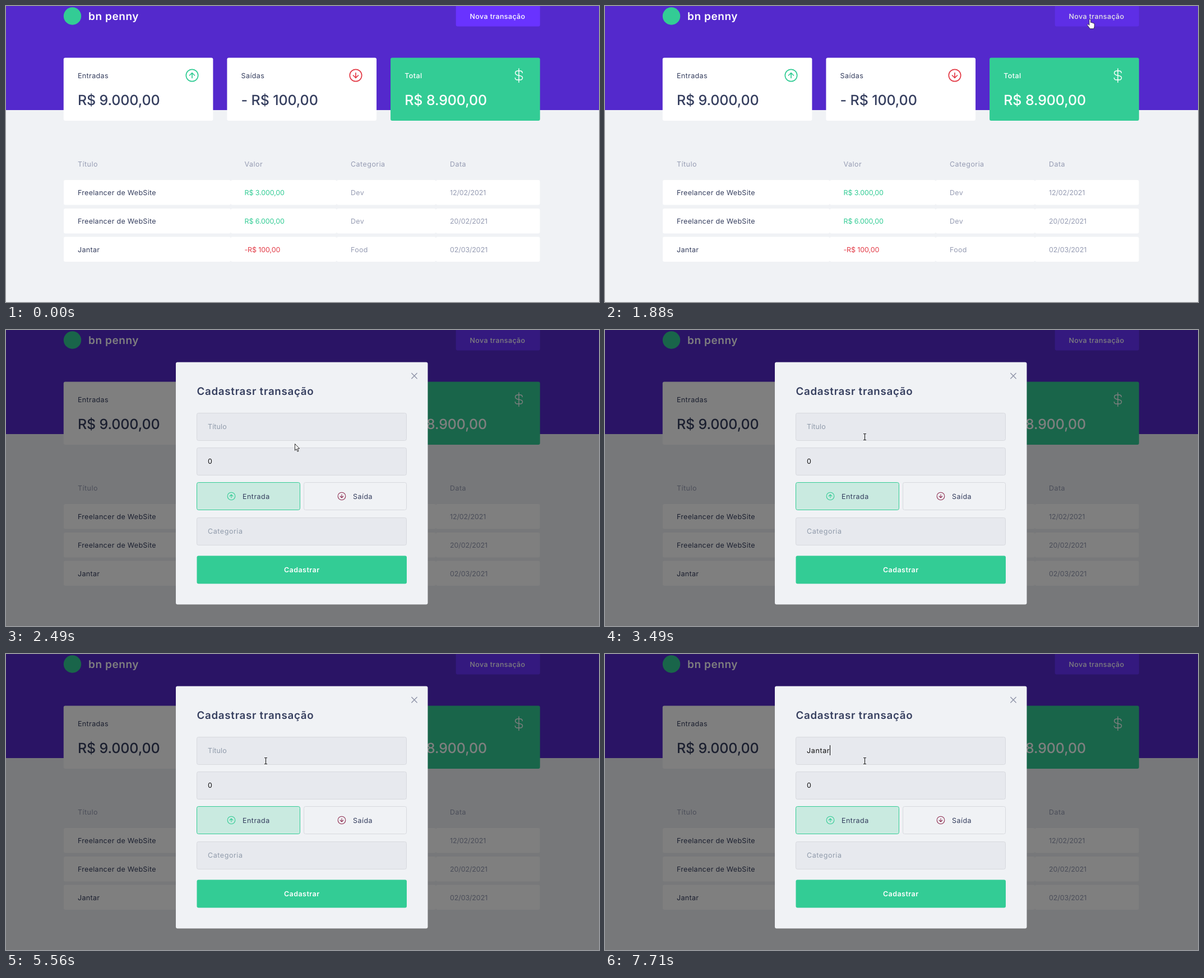
An HTML page for the animation above (8000 ms loop, 1058 by 529 pixels).

```html
<!DOCTYPE html>
<html lang="pt-BR">
<head>
<meta charset="utf-8">
<title>Transações</title>
<style>
  html, body { margin: 0; width: 100%; height: 100%; overflow: hidden; background: #f0f2f5; }
  svg { display: block; width: 1058px; height: 529px; }
  text { font-family: Inter, "Open Sans", sans-serif; white-space: pre; text-rendering: geometricPrecision; }
  text.plain { font-family: "Liberation Sans", Arial, sans-serif; }
</style>
</head>
<body>
<svg id="stage" viewBox="0 0 1058 529"></svg>
<script>
const LOOP = 8000;
const GREEN = '#33cc95', RED = '#e33b47', INK = '#363f5f', SOFT = '#969cb3', PAPER = '#f0f2f5';
const LABEL = 0.037, BODY = 0.024, DIGITS = -0.01;

const rect = (x, y, w, h, fill, r = 0, extra = '') =>
  `<rect x="${x}" y="${y}" width="${w}" height="${h}" rx="${r}" fill="${fill}" ${extra}/>`;

const text = (s, x, y, fill, { size = 12.5, weight = 400, track = LABEL, extra = '' } = {}) =>
  `<text x="${x}" y="${y}" fill="${fill}" font-size="${size}" font-weight="${weight}" letter-spacing="${track}em" ${extra}>${s}</text>`;

// Circled arrow; dir is -1 for up, 1 for down
const arrowIcon = (x, y, r, dir, color, width) => {
  const a = r * 0.42, tip = y + dir * a;
  return `<g fill="none" stroke="${color}" stroke-width="${width}" stroke-linecap="round" stroke-linejoin="round">
    <circle cx="${x}" cy="${y}" r="${r}"/>
    <path d="M${x} ${y - dir * a}V${tip}M${x - a} ${y}L${x} ${tip}L${x + a} ${y}"/></g>`;
};

const dollarIcon = (x, y) =>
  `<path transform="translate(${x} ${y})" fill="none" stroke="#fff" stroke-width="1.4" stroke-linecap="round"
    d="M0-12V12.5M6.3-4.5A3.8 3.8 0 0 0 2.5-8H-2.5A4 4 0 0 0-6.3-4C-6.3 2 6.6-1.5 6.6 4.2A3.8 3.8 0 0 1 2.8 8H-2.8A3.8 3.8 0 0 1-6.6 4.5"/>`;

function card(i, label, value, fill, ink, icon) {
  const x = 102.75 + i * 291.67;
  return rect(x, 92.5, 266.67, 112.5, fill, 3)
    + text(label, x + 25.2, 129, ink, { weight: ink === '#fff' ? 500 : 400, track: 0.03 })
    + text(value, x + 25.2, 176.5, ink, { size: 25, weight: 500, track: -0.005 })
    + icon;
}

function row(y, title, value, color, kind, date) {
  const edges = [103, 401, 590, 767, 952.5];
  const cells = edges.slice(1).map((e, i) => rect(edges[i], y, e - edges[i], 44.5, '#fff', 3)).join('');
  const base = y + 27;
  return cells
    + text(title, 128, base, INK, { track: BODY })
    + text(value, 425.5, base, color, { track: DIGITS })
    + text(kind, 615, base, SOFT, { track: BODY })
    + text(date, 792, base, SOFT, { track: DIGITS });
}

const page = () =>
  rect(0, 0, 1058, 186, '#5429cc')
  + `<circle cx="118.5" cy="18" r="15.7" fill="${GREEN}"/>`
  + text('bn penny', 147, 24.5, '#fff', { size: 19, weight: 600, track: 0.03 })
  + `<g id="newBtn">${rect(802.75, -13, 150, 49.5, '#6933ff', 3)}${text('Nova transação', 827.5, 22.7, '#fff', { weight: 500, track: 0.03 })}</g>`
  + card(0, 'Entradas', 'R$ 9.000,00', '#fff', INK, arrowIcon(332, 124, 10.7, -1, GREEN, 1.7))
  + card(1, 'Saídas', '- R$ 100,00', '#fff', INK, arrowIcon(624, 124, 10.7, 1, RED, 1.7))
  + card(2, 'Total', 'R$ 8.900,00', GREEN, '#fff', dollarIcon(915, 124))
  + [['Título', 128], ['Valor', 425.5], ['Categoria', 615], ['Data', 792]]
      .map(([s, x]) => text(s, x, 287.3, SOFT)).join('')
  + row(311, 'Freelancer de WebSite', 'R$ 3.000,00', GREEN, 'Dev', '12/02/2021')
  + row(362, 'Freelancer de WebSite', 'R$ 6.000,00', GREEN, 'Dev', '20/02/2021')
  + row(412.5, 'Jantar', '-R$ 100,00', RED, 'Food', '02/03/2021');

const box = (x, y, w, fill, line) => rect(x + 0.5, y + 0.5, w - 1, 49, fill, 3, `stroke="${line}"`);

const field = (y, content) => box(340, y, 375, '#e7e9ee', '#d7d9de') + content;

const modal = () =>
  rect(0, 0, 1058, 529, '#000', 0, 'opacity=".5"')
  + rect(303, 57.5, 449.5, 433, PAPER, 3, 'id="panel"')
  + text('Cadastrasr transação', 340.5, 115.5, INK, { size: 18.75, weight: 600, extra: 'class="settled"' })
  + text('Cadastrasr transação', 340.5, 115, INK, { size: 18.75, weight: 700, track: 0, extra: 'class="plain early"' })
  + `<path class="settled" d="M723.8 77.3l9.4 9.4m0-9.4l-9.4 9.4" stroke="#8f94a8" stroke-width="1.4" stroke-linecap="round"/>`
  + '<g id="form">'
  + field(148, text('Título', 360, 176.5, '#909bab', { extra: 'id="hint"', track: 0.01 })
      + text('', 360, 176.5, '#111', { extra: 'id="typed"', track: 0.05 }))
  + field(210, text('0', 360, 239, '#111', { track: 0 }))
  + box(340, 272, 185, '#c9eae0', GREEN) + arrowIcon(402, 297, 6.8, -1, GREEN, 1.1)
  + text('Entrada', 422, 301.5, INK)
  + box(531, 272, 184, PAPER, '#d7d9de') + arrowIcon(599, 297, 6.8, 1, '#8f2f52', 1.1)
  + text('Saída', 619, 301.5, INK)
  + field(335, text('Categoria', 360, 364, '#909bab', { track: 0.045 }))
  + rect(340.5, 403.5, 374.5, 50, GREEN, 3)
  + text('Cadastrar', 527.8, 432.5, '#fff', { weight: 600, extra: 'text-anchor="middle" class="settled"' })
  + text('Cadastrar', 527.8, 432.3, '#fff', { weight: 700, track: 0, extra: 'text-anchor="middle" class="plain early"' })
  + '</g>'
  + rect(360, 163, 1, 18, '#000', 0, 'id="caret"');

const pointers = () => `
  <g id="arrow"><path d="M.5.5V12.2L3.2 9.7L5.1 14.2L7 13.4L5.1 9H8.6Z" fill="#fff" stroke="#111" stroke-width=".9"/></g>
  <g id="hand"><path d="M0 10.6V1.7Q0 .4 1.3.4T2.6 1.7V6.6Q4.5 5.8 5.1 7.2Q7 6.6 7.4 8Q9.2 7.6 9.2 9.6V13Q9.2 15 7.8 17.6H1.2Q0 15.4-3.2 11.6Q-4 10.2-3 9.6Q-1.8 9.3 0 11.4Z"
    fill="#fff" stroke="#111" stroke-width=".7" stroke-linejoin="round"/></g>
  <g id="beam"><path d="M-2.5-5.5H-.6L0-5L.6-5.5H2.5M0-5V5M-2.5 5.5H-.6L0 5L.6 5.5H2.5" fill="none" stroke="#222" stroke-width="1.1"/></g>`;

const stage = document.getElementById('stage');
stage.innerHTML = page() + `<g id="modal">${modal()}</g>` + pointers();

const $ = id => document.getElementById(id);
const show = (el, on) => { el.style.display = on ? '' : 'none'; };
const clamp = v => Math.max(0, Math.min(1, v));
const settledParts = stage.querySelectorAll('.settled');
const earlyParts = stage.querySelectorAll('.early');

// Pointer strokes: start, end, number of steps, quadratic curve points
const strokes = [
  [250, 740, 8, [513, 520], [516, 150], [1022, 140]],
  [810, 1020, 4, [1010, 125], [960, 90], [892, 60]],
  [1150, 1490, 6, [892, 60], [880, 36], [864, 23]],
  [2090, 2490, 6, [864, 23], [690, 70], [515, 203]],
  [2560, 2700, 3, [515, 203], [490, 198], [461.5, 185]]
];
const OPEN = 1950, SETTLE = 2020, LEAVE = 2090, FOCUS = 2910;
const caretOn = [[3040, 3490], [3960, 4560], [5030, 5560], [6090, LOOP]];
const word = 'Jantar', keyTimes = [6160, 6430, 6700, 7230, 7510, 7710];

function pointerAt(t) {
  const stroke = strokes.filter(s => t >= s[0]).pop();
  if (!stroke) return null;
  const [from, to, n, a, b, c] = stroke;
  const step = Math.floor((t - from) / (to - from) * (n - 1) + 1e-6);
  let u = clamp(step / (n - 1));
  u = u * u * (3 - 2 * u);
  return [0, 1].map(i => (1 - u) ** 2 * a[i] + 2 * u * (1 - u) * b[i] + u * u * c[i]);
}

function render(t) {
  const open = t >= OPEN, settled = t >= SETTLE;
  show($('modal'), open);
  settledParts.forEach(el => show(el, settled));
  earlyParts.forEach(el => show(el, !settled));
  $('form').setAttribute('transform', `translate(0 ${settled ? 0 : -3})`);
  $('panel').setAttribute('y', settled ? 57.5 : 60);
  $('panel').setAttribute('height', settled ? 433 : 428);

  const hover = clamp((t - 1354) / 200) - clamp((t - LEAVE) / 200);
  $('newBtn').style.filter = hover > 0 ? `brightness(${1 - 0.1 * hover})` : 'none';

  const count = keyTimes.filter(k => t >= k).length;
  const typed = $('typed');
  typed.textContent = word.slice(0, count);
  show($('hint'), count === 0);
  show($('caret'), caretOn.some(([a, b]) => t >= a && t < b));
  const width = open && count ? typed.getComputedTextLength() : 0;
  $('caret').setAttribute('x', Math.floor(360 + width));

  const p = pointerAt(t);
  const kind = !p ? '' : t >= FOCUS ? 'beam' : !open && p[1] < 37 && p[0] > 803 ? 'hand' : 'arrow';
  for (const id of ['arrow', 'hand', 'beam']) show($(id), id === kind);
  if (kind) {
    const [x, y] = kind === 'beam' ? [463.5, 191] : p.map(Math.round);
    $(kind).setAttribute('transform', `translate(${x} ${y})`);
  }
}

const start = performance.now();
function tick() {
  render((performance.now() - start) % LOOP);
  requestAnimationFrame(tick);
}
tick();
</script>
</body>
</html>
```
